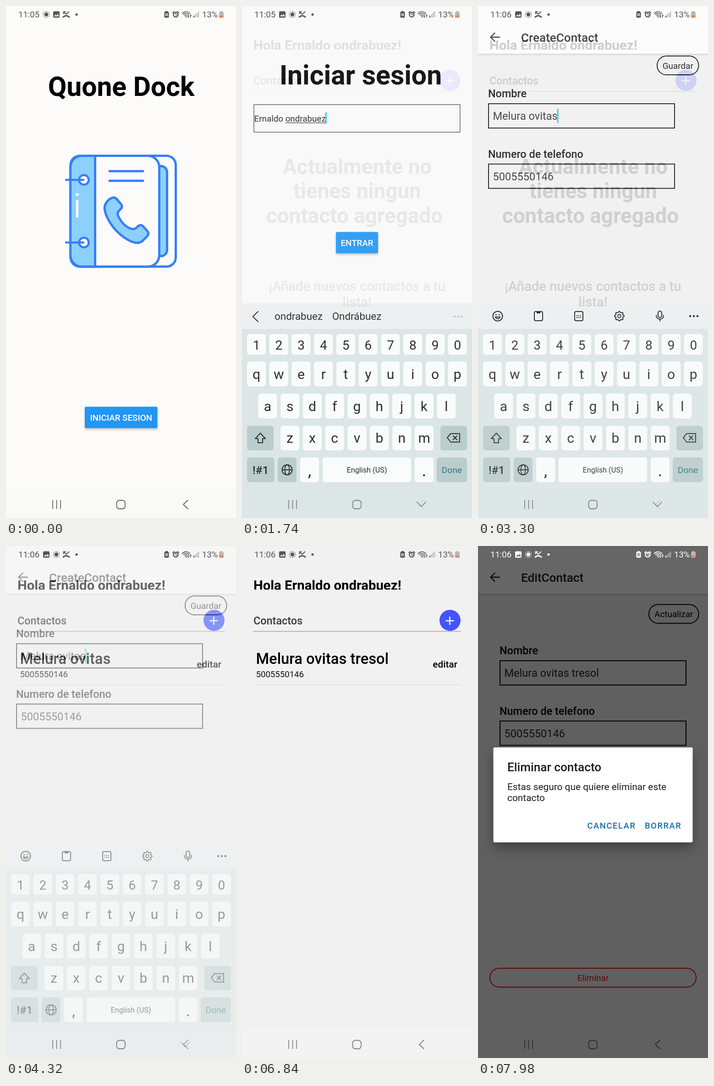
An HTML page with a canvas that plays this animation: 502 by 1116 pixels, repeating every 8000 ms.

```html
<!DOCTYPE html>
<html lang="es">
<head>
<meta charset="utf-8">
<title>Contactos</title>
<style>
html, body { margin: 0; width: 100%; height: 100%; overflow: hidden; background: #fcfbfa; }
canvas { display: block; width: 502px; height: 1116px; }
</style>
</head>
<body>
<canvas id="stage" width="502" height="1116"></canvas>
<script>
const W = 502, H = 1116;
const LOOP = 8000, HOLD = 600, STEP = 60, STEPS = 10, SLOT = 1140;
const APP = 'Quone Dock', FIRST = 'Ernaldo', LAST = 'ondrabuez';
const CONTACT = 'Melura ovitas', EXTRA = 'tresol', PHONE = '5005550146';
const BLUE = '#2196f3', INK = '#1c1c1e';

let c; // context of the screen being drawn

// ---- drawing helpers ----
function rect(x, y, w, h, fill) {
  c.fillStyle = fill;
  c.fillRect(x, y, w, h);
}

function round(x, y, w, h, r, fill, stroke, lw = 2) {
  c.beginPath();
  c.roundRect(x, y, w, h, r);
  paint(fill, stroke, lw);
}

function paint(fill, stroke, lw) {
  if (fill) { c.fillStyle = fill; c.fill(); }
  if (stroke) { c.strokeStyle = stroke; c.lineWidth = lw; c.stroke(); }
}

function disc(x, y, r, fill, stroke, lw = 2) {
  c.beginPath();
  c.arc(x, y, r, 0, Math.PI * 2);
  paint(fill, stroke, lw);
}

function line(color, lw, ...pts) {
  c.beginPath();
  for (let i = 0; i < pts.length; i += 2) c.lineTo(pts[i], pts[i + 1]);
  paint(null, color, lw);
}

function shape(d, fill, stroke, lw) {
  const p = new Path2D(d);
  if (fill) { c.fillStyle = fill; c.fill(p); }
  if (stroke) { c.strokeStyle = stroke; c.lineWidth = lw; c.stroke(p); }
}

function text(s, x, y, size, color = '#000', weight = 400, align = 'left', gap = 0) {
  c.font = `${weight} ${size}px Roboto, sans-serif`;
  c.letterSpacing = gap + 'px';
  c.textAlign = align;
  c.fillStyle = color;
  c.fillText(s, x, y);
  return c.measureText(s).width;
}

function shadowed(blur, dy, alpha, draw) {
  c.save();
  c.shadowColor = `rgba(0,0,0,${alpha})`;
  c.shadowBlur = blur;
  c.shadowOffsetY = dy;
  draw();
  c.restore();
}

// ---- system bars ----
function sunIcon(x, col) {
  disc(x, 18.5, 4.2, col);
  for (let i = 0; i < 12; i++) {
    const a = i * Math.PI / 6;
    disc(x + 6.6 * Math.cos(a), 18.5 + 6.6 * Math.sin(a), 0.9, col);
  }
}

function imageIcon(x, col, bg) {
  round(x - 7, 11.5, 14, 14, 2.5, col);
  shape(`M${x - 5} 22.5l3-4 2.5 2.5 2.5-4 3 5.5z`, bg);
}

function statusBar(time, col, bg, sunFirst) {
  text(time, 27, 25, 18.5, col);
  sunIcon(sunFirst ? 88 : 110, col);
  imageIcon(sunFirst ? 110 : 88, col, bg);
  line(col, 1.8, 125.5, 17, 125.5, 12.5, 130, 12.5);
  line(col, 1.8, 126, 13, 131.5, 18, 137.5, 12.5);
  shape('M125 24Q131.500 18.500 138 24', null, col, 3);
  disc(154, 18.5, 2.6, col);

  round(345.5, 12.5, 10, 13, 2, col);
  rect(348, 11, 5, 2, col);
  disc(350.5, 19, 2.2, null, bg, 1.4);
  disc(370.5, 19, 5, null, col, 2.4);
  line(col, 2, 364, 14.5, 367, 12);
  line(col, 2, 374, 12, 377, 14.5);
  line(col, 1.4, 370.5, 16, 370.5, 19, 373, 20);
  for (const r of [3.5, 7, 10.5]) {
    c.beginPath();
    c.arc(393, 23, r, -Math.PI * 0.8, -Math.PI * 0.2);
    paint(null, col, 1.7);
  }
  disc(393, 23.5, 1.6, col);
  line(col, 1.3, 398.5, 19, 398.5, 25, 396.5, 23);
  line(col, 1.3, 402.5, 25, 402.5, 19, 404.5, 21);
  for (let i = 0; i < 4; i++) {
    const h = 4 + i * 3;
    rect(409 + i * 3.4, 25 - h, 2, h, i ? '#b4b4b4' : col);
  }
  text('13%', 428, 25, 18.5, col);
  round(465, 12.5, 10, 13, 2, '#b9b9b9');
  rect(468, 11, 4, 2, '#b9b9b9');
  round(465, 20.5, 10, 5, [0, 0, 2, 2], '#e58a6c');
}

function navBar(col, down) {
  for (const x of [102, 110.5, 119]) line(col, 1.7, x, 1077.5, x, 1095.5);
  round(241.5, 1077.5, 18.5, 18.5, 6, null, col, 1.8);
  if (down) line(col, 1.8, 381.5, 1081, 391.5, 1091, 401.5, 1081);
  else line(col, 1.8, 397, 1077, 387, 1086.5, 397, 1096);
}

function base(bg, nav) {
  rect(0, 0, W, H, bg);
  rect(0, 1053, W, H - 1053, nav);
}

// ---- keyboard ----
function key(x, y, w, h, label, size, baseline, fill = '#fcfefe', col = '#161818', weight = 400) {
  round(x, y, w, h, 6, fill);
  if (label) text(label, x + w / 2, baseline, size, col, weight, 'center');
}

function keyRow(chars, x, y, h, size, baseline, pitch = 48.75) {
  [...chars].forEach((ch, i) => key(x + i * pitch, y, 41, h, ch, size, baseline));
}

function dots(x, y, col) {
  for (const d of [-8, 0, 8]) disc(x + d, y, 2.2, col);
}

function keyboard() {
  const soft = '#b4c9c8', ink = '#161818';
  rect(0, 648, W, 57, '#ecf0f2');
  rect(0, 704, W, H - 704, '#dae5e5');
  keyRow('1234567890', 11, 715, 45, 28, 749);
  keyRow('qwertyuiop', 11, 775, 54, 30, 813);
  keyRow('asdfghjkl', 35.5, 845, 54, 30, 882.5);
  keyRow('zxcvbnm', 84, 915, 53.5, 30, 952, 48.85);
  key(11, 915, 58, 53.5, '', 0, 0, soft);
  key(433, 915, 58, 53.5, '', 0, 0, soft);
  key(11, 984, 59.5, 54, '!#1', 24.5, 1020, soft, ink, 500);
  key(78, 984, 41, 54, '', 0, 0, soft);
  key(127, 984, 41, 54, ',', 32, 1025, undefined, ink, 500);
  key(176, 984, 193, 54, 'English (US)', 16.3, 1017);
  key(377, 984, 41, 54, '.', 32, 1025, undefined, ink, 500);
  key(425, 984, 66, 54, 'Done', 19.2, 1018, soft, '#1a6a72');

  shape('M40 931L51 943H45V952H35V943H29Z', null, ink, 2);
  shape('M448 941L455.500 932H475V950.500H455.500Z', null, ink, 2);
  line(ink, 2, 461, 937, 469, 945.5);
  line(ink, 2, 469, 937, 461, 945.5);
  disc(98.5, 1011, 11, null, ink, 2);
  c.beginPath();
  c.ellipse(98.5, 1011, 5, 11, 0, 0, Math.PI * 2);
  paint(null, ink, 1.8);
  line(ink, 1.8, 87.5, 1011, 109.5, 1011);
  navBar('#7d8585', true);
}

function suggestions(words, dotCol) {
  line('#222', 2, 35, 666, 23.5, 677, 35, 688);
  words.forEach((w, i) => text(w, 123.5 + i * 127, 684, 22.4, '#1c1e1e', 400, 'center'));
  dots(472, 677, dotCol);
}

function toolIcons() {
  const col = '#000';
  disc(43, 676, 10.5, null, col);
  disc(39.5, 673, 1.5, col);
  disc(46.5, 673, 1.5, col);
  shape('M37.500 678Q43 686 48.500 678Z', null, col, 1.8);
  round(123, 666, 18, 20, 3, null, col);
  rect(128, 665, 8, 5, col);
  round(211, 666, 18, 20, 3, null, col);
  for (let i = 0; i < 6; i++) rect(215 + i % 3 * 4, 674 + (i > 2) * 4, 2, 2, col);
  c.beginPath();
  for (let i = 0; i < 72; i++) {
    const a = i * Math.PI / 36, r = 9.3 + 1.2 * Math.cos(8 * a);
    c.lineTo(308.5 + r * Math.cos(a), 676 + r * Math.sin(a));
  }
  c.closePath();
  paint(null, col, 2);
  disc(308.5, 676, 3.5, null, col, 1.8);
  round(393, 665, 8, 14, 4, null, col);
  shape('M389 674Q389 682.500 397 682.500T405 674M397 683V687', null, col, 1.8);
  dots(471, 676, col);
}

// ---- screen parts ----
function solidButton(x, y, w, label) {
  shadowed(5, 3, 0.25, () => round(x, y, w, 46.5, 2.5, BLUE));
  text(label, x + w / 2, y + 30.5, 18.8, '#fff', 500, 'center');
}

function pill(x, y, w, h, label, col) {
  round(x, y, w, h, 20, null, col, 2);
  text(label, x + w / 2, y + 27.5, 18.9, col, 400, 'center');
}

function caret(x, y, h) {
  rect(x, y, 3, h, '#14cfcb');
}

function book() {
  const edge = '#357ffa', tint = '#8dd0fd', paper = '#fcfbfa';
  round(141, 326.5, 229.5, 241.5, 20, null, edge, 5);
  round(320, 349, 31.5, 196, 13, tint, edge, 5);
  round(140.5, 326.5, 194, 241.5, 25, paper, edge, 5);
  round(140.5, 326.5, 54, 241.5, [25, 0, 0, 25], tint, edge, 5);
  for (const y of [379, 515.5]) {
    disc(170, y, 10.5, '#fff', edge, 4.5);
    line(edge, 4.5, 131, y, 169, y);
  }
  disc(155.5, 411, 3.2, '#fff');
  line('#fff', 5, 155.5, 425, 155.5, 459);
  for (const y of [360, 381]) line(edge, 5, 226, y, 299, y);
  shape('M226 421Q236 414 242 421L252 433Q255 438 250 443L247 446Q241 451 246 460' +
    'Q255 478 271 485Q279 488 284 484L288 480Q294 475 299 480L309 491Q313 496 308 502' +
    'L298 512Q292 517 283 516Q262 512 238 487Q217 462 215 440Q215 430 226 421Z', tint, edge, 5);
}

function listTop(time) {
  base('#f1f1f1', '#f3f3f3');
  statusBar(time, '#555', '#f1f1f1');
  c.save();
  c.beginPath();
  c.rect(0, 60, W, 35);
  c.clip();
  text(`Hola ${FIRST} ${LAST}!`, 25, 95.5, 29.3, '#000', 600);
  c.restore();
  text('Contactos', 25, 171, 23.4, '#3a3a3a', 500);
  line('#b7b7b7', 2, 25, 186, 477, 186);
  disc(454, 162, 23, '#4355fe');
  line('#fff', 2.6, 445.5, 163, 461.5, 163);
  line('#fff', 2.6, 453.5, 155, 453.5, 171);
  navBar('#808080');
}

function contactRow(name) {
  text(name, 30.5, 257, 32.7, '#000', 500);
  text(PHONE, 30.5, 286, 18.6, '#111');
  text('editar', 470, 265, 20.8, '#000', 500, 'right');
  line('#dedede', 1.5, 25, 302.5, 477, 302.5);
}

// Header, two labelled fields and the action pill; dy moves the fields.
function form(title, x, action, pillX, name, dy = 0) {
  base('#f1f1f1', '#f1f1f1');
  shadowed(4, 1, 0.25, () => rect(0, 0, W, 104, '#fff'));
  line(INK, 2.4, 47, 68, 28, 68);
  line(INK, 2.4, 36.5, 59, 27.5, 68, 36.5, 77);
  text(title, 94, 78, 26.1, INK, 500);
  pill(pillX, 109 + dy / 2, 481.5 - pillX, 41, action, '#000');
  [['Nombre', name], ['Numero de telefono', PHONE]].forEach(([label, value], i) => {
    const y = dy + i * 131.5;
    text(label, x - 1, 199 + y, 23.4, '#000', 500);
    c.lineJoin = 'miter';
    c.strokeStyle = '#000';
    c.lineWidth = 2;
    c.strokeRect(x, 213 + y, 406, 53);
    c.lineJoin = 'round';
    text(value, x + 9.5, 248 + y, 23.6, '#222');
  });
}

function nameWidth(s) {
  c.font = '400 23.6px Roboto, sans-serif';
  return c.measureText(s).width;
}

// ---- screens ----
function home() {
  base('#fcfbfa', '#f9f9f8');
  statusBar('11:05', '#555', '#fcfbfa', true);
  text(APP, 251.5, 196, 58.8, '#000', 700, 'center');
  book();
  solidButton(172, 873.5, 158.5, 'INICIAR SESION');
  navBar('#626262');
}

function login() {
  base('#fcfbfa', '#fcfbfa');
  statusBar('11:05', '#555', '#fcfbfa');
  text('Iniciar sesion', 259, 171, 58.9, '#000', 700, 'center');
  c.strokeStyle = '#7f7f7f';
  c.lineWidth = 2;
  c.strokeRect(26, 215, 450, 60);
  const lead = text(FIRST + ' ', 26.5, 252, 18.8, '#222');
  const tail = text(LAST, 26.5 + lead, 252, 18.8, '#222');
  rect(26.5 + lead, 254, tail, 1.2, '#222');
  caret(25.5 + lead + tail, 232, 25);
  solidButton(205, 492.5, 92, 'ENTRAR');
  keyboard();
  suggestions([LAST, 'Ondrábuez'], '#bcc2c2');
}

function emptyList() {
  listTop('11:05');
  const col = '#505050';
  text('Actualmente no', 251.5, 365.5, 45.75, col, 600, 'center');
  text('tienes ningun', 251.5, 419, 45.75, col, 600, 'center');
  text('contacto agregado', 245.5, 473, 45.75, col, 600, 'center');
  text('¡Añade nuevos contactos a tu', 251, 620.5, 29.2, col, 500, 'center');
  text('lista!', 251, 654.5, 29.2, col, 500, 'center');
}

function create() {
  form('CreateContact', 23, 'Guardar', 391, CONTACT);
  statusBar('11:06', '#555', '#fff');
  caret(31.5 + nameWidth(CONTACT), 224, 31);
  keyboard();
  toolIcons();
}

function edit() {
  const full = `${CONTACT} ${EXTRA}`;
  form('EditContact', 48, 'Actualizar', 373, full);
  statusBar('11:06', '#555', '#fff');
  const from = 57.5 + nameWidth(CONTACT + ' '), to = 57.5 + nameWidth(full);
  rect(from, 250, to - from, 1.4, '#222');
  caret(to - 1, 224, 31);
  pill(26, 514.5, 450, 41, 'Eliminar', '#e01010');
  keyboard();
  suggestions([EXTRA, 'transcript', 'treasure'], '#222');
}

function confirmDelete() {
  form('EditContact', 48, 'Actualizar', 373, `${CONTACT} ${EXTRA}`, 37);
  pill(26, 920.5, 450, 41, 'Eliminar', '#e01010');
  navBar('#6e6e6e');
  rect(0, 0, W, H, 'rgba(0,0,0,0.6)');
  statusBar('11:06', '#fff', '#666');
  shadowed(26, 12, 0.35, () => round(33.5, 439, 435, 207, 3, '#fff'));
  text('Eliminar contacto', 64, 490.5, 26.2, INK, 500);
  text('Estas seguro que quiere eliminar este', 64, 531.5, 20.85, INK);
  text('contacto', 64, 556, 20.85, INK);
  text('CANCELAR', 238.5, 616, 18.3, '#1a6ca6', 500, 'left', 1.63);
  text('BORRAR', 364, 616, 18.3, '#1a6ca6', 500, 'left', 1.63);
}

function render(draw) {
  const layer = document.createElement('canvas');
  layer.width = W;
  layer.height = H;
  c = layer.getContext('2d');
  c.lineCap = c.lineJoin = 'round';
  draw();
  return layer;
}

const screens = [
  home, login, emptyList, create,
  () => { listTop('11:06'); contactRow(CONTACT); },
  edit,
  () => { listTop('11:06'); contactRow(`${CONTACT} ${EXTRA}`); },
  confirmDelete
].map(render);

// ---- playback: hold each screen, then dissolve in ten steps ----
const stage = document.getElementById('stage').getContext('2d');

function frame() {
  const t = performance.now() % LOOP;
  const i = Math.floor(t / SLOT), rest = t - i * SLOT;
  stage.globalAlpha = 1;
  stage.drawImage(screens[i], 0, 0);
  if (rest >= HOLD) {
    stage.globalAlpha = (Math.floor((rest - HOLD) / STEP) + 1) / STEPS;
    stage.drawImage(screens[i + 1], 0, 0);
  }
  requestAnimationFrame(frame);
}
frame();
</script>
</body>
</html>
```
